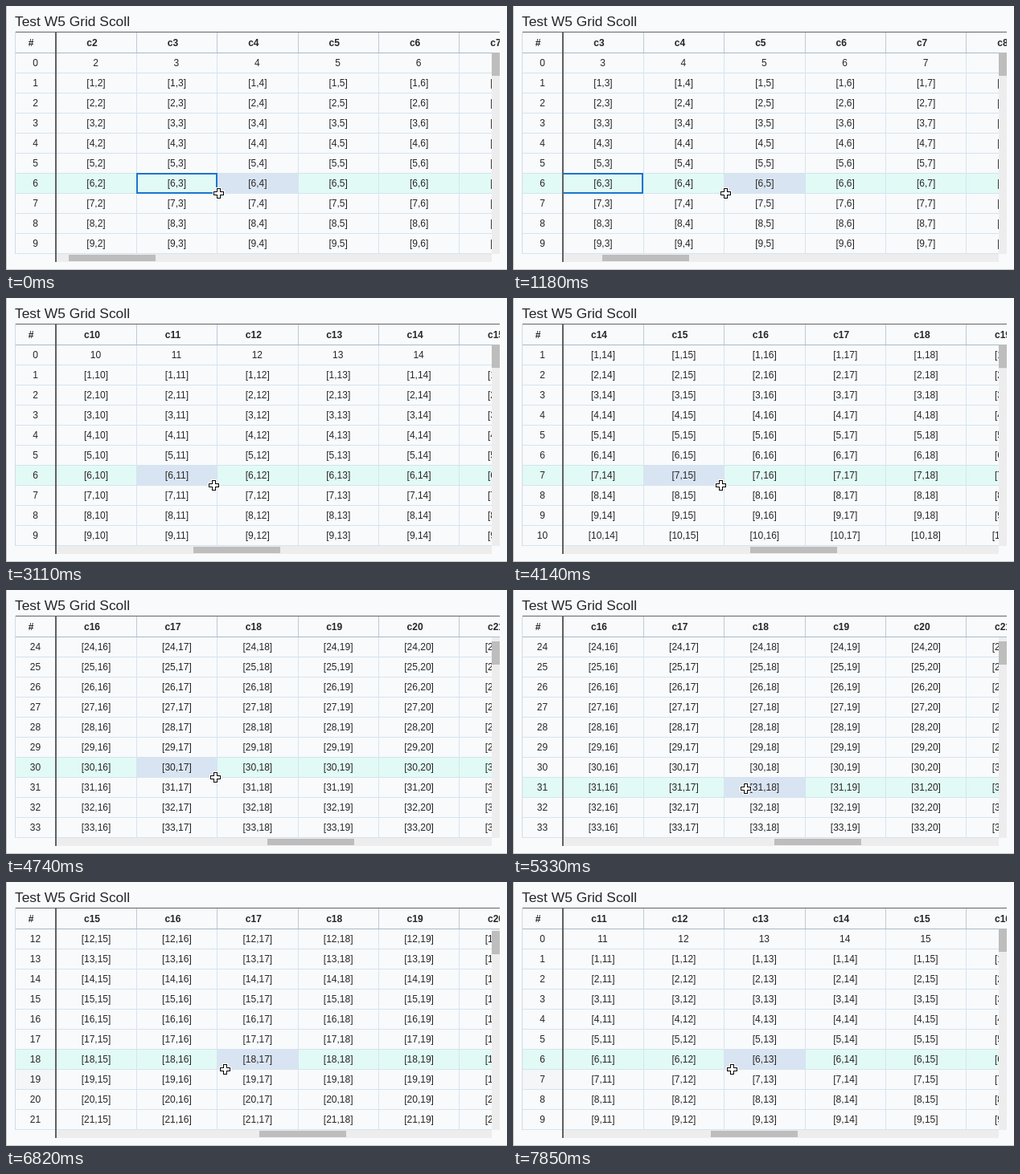
Animation of 623 by 329 pixels, one loop 7990 ms. Source, as an HTML page with a canvas:

```html
<!DOCTYPE html>
<html lang="en">
<head>
<meta charset="utf-8">
<title>Grid scroll</title>
<style>
html, body { margin: 0; width: 100%; height: 100%; overflow: hidden; background: #f9fafc }
canvas { display: block }
</style>
</head>
<body>
<canvas width="623" height="329"></canvas>
<script>
const ctx = document.querySelector('canvas').getContext('2d', { alpha: false });
const LOOP = 7990, STEPS = 54;
const LEFT = 62, TOP = 58, COL_W = 100.4, ROW_H = 25, ROWS = 10, COLS = 6;
const FONT = '"Liberation Sans", Arial, sans-serif';

// Keyframes: [step, value]
const thumbKeys = [[0, 78], [9, 121], [10, 121], [15, 169], [21, 233], [28, 305], [32, 325], [45, 325], [53, 246]];
const rowKeys = [[26.67, 0], [32, 24], [43.3, 24], [48.6, 0]];
const cursorX = [[0, 264], [8, 264], [9, 258], [28, 258], [32, 260], [33, 270], [36, 289], [38, 289], [41, 272]];
const cursorY = [[32, 233], [33, 240], [36, 247], [38, 247], [41, 233]];

function at(keys, step) {
  const i = keys.findIndex(k => k[0] > step);
  if (i === 0) return keys[0][1];
  if (i < 0) return keys[keys.length - 1][1];
  const [s0, v0] = keys[i - 1], [s1, v1] = keys[i];
  return v0 + (v1 - v0) * (step - s0) / (s1 - s0);
}

function rect(x, y, w, h, color) {
  ctx.fillStyle = color;
  ctx.fillRect(x, y, w, h);
}

function text(str, x, y, font = '12px', align = 'center') {
  ctx.font = `${font} ${FONT}`;
  ctx.textAlign = align;
  ctx.fillStyle = '#262626';
  ctx.fillText(str, x, y);
}

function clipped(x, y, w, h, paint) {
  ctx.save();
  ctx.beginPath();
  ctx.rect(x, y, w, h);
  ctx.clip();
  paint();
  ctx.restore();
}

const colX = c => Math.round(61.3 + c * COL_W);
const rowY = r => TOP + r * ROW_H;

function drawBody(firstCol, firstRow, hoverCol, hoverRow, step) {
  if (step >= 41) rect(12, rowY(7), step < 44 ? 592 : 49, ROW_H, '#f4f6f8');
  rect(12, rowY(hoverRow), 592, ROW_H, '#e1faf5');
  rect(colX(hoverCol), rowY(hoverRow), 101, ROW_H, '#d9e4f2');
  for (let r = 0; r <= ROWS; r++) rect(11, rowY(r), 593, 1, '#d5e4ef');
  for (let c = 1; c < COLS; c++) rect(colX(c), TOP, 1, 251, '#d5e4ef');
  for (let r = 0; r < ROWS; r++) {
    const row = firstRow + r, y = rowY(r) + 17;
    text(row, 36.5, y);
    for (let c = 0; c < COLS; c++) {
      const col = firstCol + c, x = 112 + c * COL_W;
      if (row) text(`[${row},${col}]`, x, y);
      else text(col, x - .5, y);
    }
  }
  const selCol = 3 - firstCol, selRow = 6 - firstRow;
  if (selCol >= 0 && selRow >= 0) {
    ctx.strokeStyle = '#1b75cf';
    ctx.lineWidth = 2;
    ctx.strokeRect(colX(selCol) + 1, rowY(selRow) + 1, 99, 24);
  }
}

function drawHeader(firstCol) {
  text('#', 31, 50, 'bold 12px');
  for (let c = 0; c < COLS; c++) {
    if (c) rect(colX(c), 33, 1, 25, '#bccad6');
    text('c' + (firstCol + c), 107 + c * COL_W, 50, 'bold 12px');
  }
  rect(11, 58, 603, 1, '#a9bac8');
  rect(11, 32, 603, 1, '#666');
}

function drawCursor(x, y) {
  for (const [half, arm, color] of [[3.5, 7.5, '#fff'], [2.5, 6.5, '#000'], [1.5, 5.5, '#fff']]) {
    rect(x - half, y - arm, half * 2, arm * 2, color);
    rect(x - arm, y - half, arm * 2, half * 2, color);
  }
}

function draw(step) {
  const thumb = Math.round(at(thumbKeys, step));
  const firstCol = 1 + Math.floor((thumb - 60.4) / 17.5);
  const firstRow = Math.round(at(rowKeys, step));
  const x = Math.round(at(cursorX, step)), y = Math.round(at(cursorY, step));
  const hoverCol = Math.floor((x - LEFT) / COL_W), hoverRow = Math.floor((y - TOP - 1) / ROW_H);

  rect(0, 0, 623, 329, '#f9fafc');
  rect(0, 0, 1, 329, '#c4c4c4');
  rect(0, 328, 623, 1, '#c4c4c4');
  text('Test W5 Grid Scoll', 11, 25, '17.4px', 'left');

  clipped(11, TOP, 593, 251, () => drawBody(firstCol, firstRow, hoverCol, hoverRow, step));
  clipped(11, 32, 603, 27, () => drawHeader(firstCol));
  rect(11, 32, 1, 277, '#cfdde8');
  rect(604, 59, 10, 250, '#ededed');
  rect(604, TOP + firstRow / 4, 10, 29, '#bdbdbd');
  rect(61, 309, 543, 10, '#ededed');
  rect(thumb, 310, 108, 8, '#bdbdbd');
  rect(61, 32, 2, 287, '#606060');
  drawCursor(x + .5, y + .5);
}

function frame(now) {
  draw(Math.floor(now % LOOP / LOOP * STEPS));
  requestAnimationFrame(frame);
}
requestAnimationFrame(frame);
</script>
</body>
</html>
```
